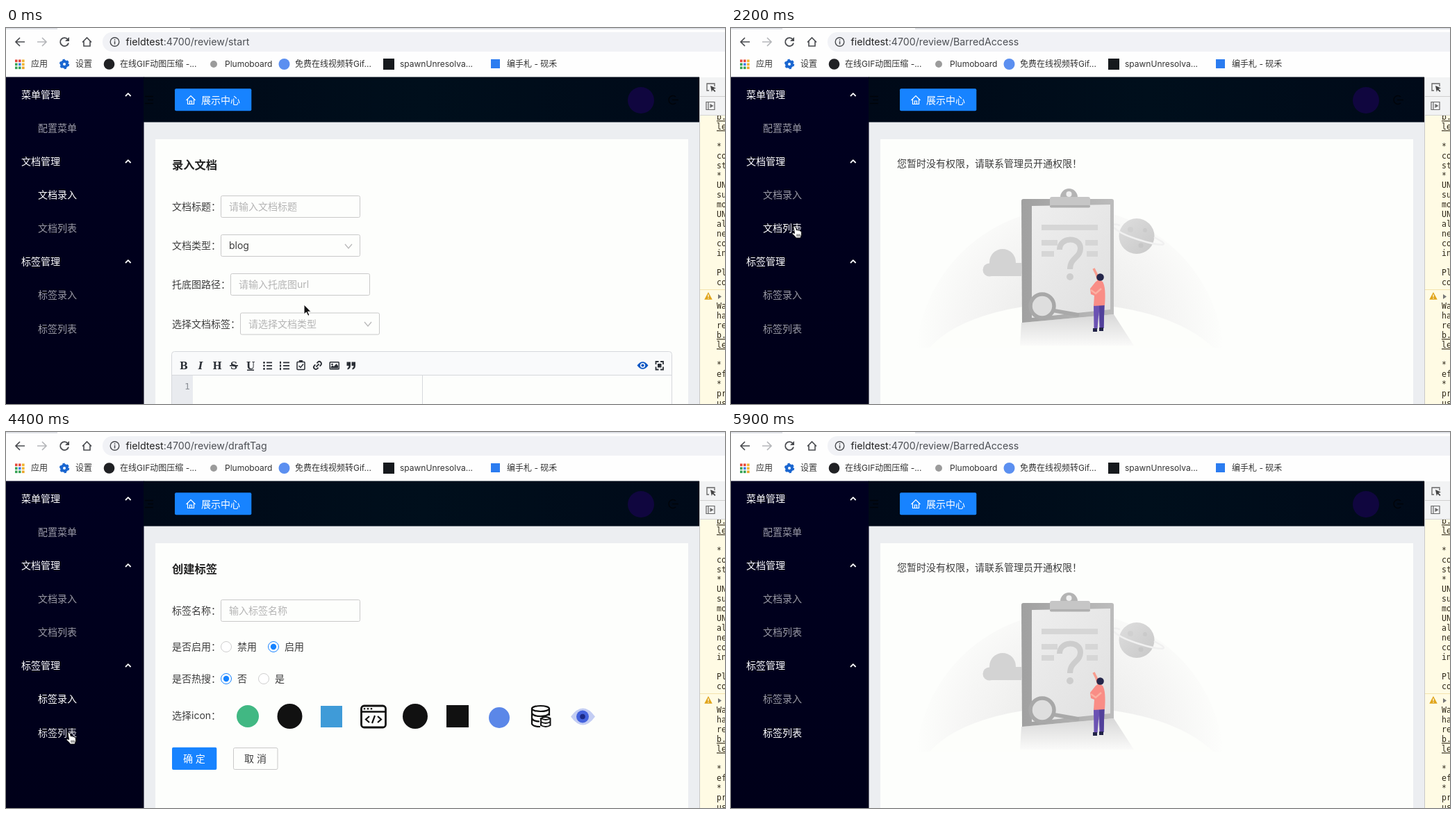
An HTML page for the animation above (6000 ms loop, 1035 px wide and 541 px high).

```html
<!DOCTYPE html>
<html lang="zh">
<head>
<meta charset="utf-8">
<style>
html, body { margin: 0; width: 100%; height: 100%; overflow: hidden; background: #fff }
svg { display: block; font-family: Inter, "Noto Sans CJK SC", "Noto Sans CJK", sans-serif }
text { white-space: pre }
.mono { font-family: "DejaVu Sans Mono", monospace }
.slab { font-family: "DejaVu Serif", "Noto Serif", serif; font-weight: bold }
</style>
</head>
<body>
<svg id="stage" width="1035" height="541" viewBox="0 0 1035 541"></svg>
<script>
const INK = '#3c3c3c', BLUE = '#1783ff', LINE = '#c9c9c9', HINT = '#b4b4b4', MEDIUM = 'font-weight="500"';

// Shape helpers; text is placed by its vertical centre
const text = (x, y, s, size = 14, fill = INK, more = '') =>
  `<text x="${x}" y="${y + size * .37}" font-size="${size}" fill="${fill}" ${more}>${s}</text>`;
const rect = (x, y, w, h, fill, more = '') =>
  `<rect x="${x}" y="${y}" width="${w}" height="${h}" fill="${fill}" ${more}/>`;
const disc = (x, y, r, fill, more = '') =>
  `<circle cx="${x}" cy="${y}" r="${r}" fill="${fill}" ${more}/>`;
const path = (d, stroke, w = 1.5, fill = 'none') =>
  `<path d="${d}" stroke="${stroke}" stroke-width="${w}" fill="${fill}"/>`;
const shape = (d, fill) => `<path d="${d}" fill="${fill}"/>`;
const frame = (x, y, w, h, stroke = LINE, r = 2, sw = 1) =>
  rect(x + .5, y + .5, w, h, 'none', `stroke="${stroke}" stroke-width="${sw}" rx="${r}"`);

const defs = `<defs>
  <radialGradient id="halo" gradientUnits="userSpaceOnUse" cx="488" cy="440" r="222">
    <stop offset=".3" stop-color="#ededec"/><stop offset=".7" stop-color="#f6f6f5"/>
    <stop offset="1" stop-color="#fdfefc"/></radialGradient>
  <linearGradient id="side" x2="0" y2="1"><stop stop-color="#000020"/><stop offset="1" stop-color="#000019"/></linearGradient>
  <linearGradient id="top"><stop stop-color="#000918"/><stop offset=".5" stop-color="#000f1c"/>
    <stop offset="1" stop-color="#000a19"/></linearGradient>
  <linearGradient id="edge"><stop stop-color="#a0a0a0"/><stop offset="1" stop-color="#bcbcbc"/></linearGradient>
  <linearGradient id="paper" x2="1" y2="1"><stop stop-color="#eeeeee"/><stop offset="1" stop-color="#e0e0e0"/></linearGradient>
  <linearGradient id="shade" x2="0" y2="1"><stop stop-color="#d8d8d8"/><stop offset="1" stop-color="#fafaf9"/></linearGradient>
  <linearGradient id="ball" x2="1" y2="1"><stop stop-color="#dedede"/><stop offset="1" stop-color="#c8c8c8"/></linearGradient>
</defs>`;

function browserBar() {
  const dark = '#4a4c50';
  let s = rect(0, 0, 1035, 71, '#fefefe') + rect(0, 0, 74, 2, '#dfe1e6') + rect(265, 0, 770, 2, '#dfe1e6')
    + rect(139, 6, 920, 28, '#f1f2f6', 'rx="14"')
    + path('M27 20H14M20 14l-6 6 6 6', dark, 1.7)
    + path('M45 20H58M52 14l6 6-6 6', '#b5b7ba', 1.7)
    + path('M89 16.5A6 6 0 1 0 90 21.5', dark, 1.8) + shape('M91 13v6h-6z', dark)
    + path('M110 20.5l6.5-6.5 6.5 6.5M112 19v7h9v-7', dark, 1.6)
    + disc(156.5, 20, 6.3, 'none', `stroke="${dark}" stroke-width="1.4"`)
    + rect(155.8, 19, 1.5, 4.5, dark) + rect(155.8, 16.3, 1.5, 1.6, dark);
  const dots = ['#e5493a', '#e5493a', '#f0b32e', '#39a457', '#4180e8', '#f0b32e', '#39a457', '#39a457', '#e9a52b'];
  dots.forEach((c, i) => s += rect(13 + i % 3 * 5, 45.5 + (i / 3 | 0) * 5, 3.6, 3.6, c));
  s += disc(84, 52, 4, 'none', 'stroke="#1a66d0" stroke-width="4"')
    + disc(84, 52, 6, 'none', 'stroke="#1a66d0" stroke-width="2.4" stroke-dasharray="3.14"')
    + disc(148.5, 52, 7.8, '#202124') + disc(299, 52, 5, '#9b9b9b') + disc(400.5, 52, 8, '#5b8ff0')
    + rect(543, 44, 16, 16, '#16191d') + rect(698, 45, 13, 13, '#2b7cf0');
  [[36, '应用'], [100, '设置'], [164, '在线GIF动图压缩 -...'], [315, 'Plumoboard'], [416, '免费在线视频转Gif...'],
   [567, 'spawnUnresolva...'], [721, '编手札 - 砚禾']].forEach(([x, w]) => s += text(x, 52, w, 12, '#333'));
  return s;
}

function devPanel() {
  let s = rect(998, 71, 37, 470, '#fffbe4') + rect(998, 71, 37, 54, '#f2f3f4')
    + rect(998, 98, 37, 1, '#cfcfcf') + rect(998, 125, 37, 1, '#d4d4d4')
    + path('M1012 90h-3v-10h11v4', '#666', 1.3) + shape('M1014 83l8 3.5-3.5 1.3 3 3-1.3 1.3-3-3-1.4 3z', '#444')
    + path('M1008 106.500h12v11h-12zM1011 106.500v11', '#666', 1.2) + shape('M1013.500 109l5 3-5 3z', '#666');
  const lines = ['b.', 'le', '', '* ', 'co', 'st', '* ', 'UN', 'su', 'mo', 'UN', 'al', 'ne', 'co', 'in', '', 'Pl', 'co', '',
    '', 'Wa', 'ha', 're', 'b.', 'le', '', '* ', 'ef', '* ', 'pr', 'us'];
  // Rows sit 14px apart, with the second message shifted below the divider
  let log = '';
  lines.forEach((w, i) => log += text(1023, (i < 19 ? 128 : 120) + i * 14, w, 11.5, '#2e2718',
    'class="mono"' + (/b\.|le/.test(w) ? ' text-decoration="underline"' : '')));
  return s + `<svg x="0" y="126" width="1035" height="415" viewBox="0 126 1035 415">${log}</svg>`
    + rect(999, 376, 36, 1, '#f3e3ad') + path('M1011 381.500l4.500 8.500h-9z', '#e0a51b', 1.5, '#e0a51b')
    + rect(1010.4, 383.500, 1.3, 3.5, '#fff') + rect(1010.4, 388, 1.3, 1.3, '#fff') + shape('M1025 383l5 3.500-5 3.500z', '#777')
    + rect(998, 71, 1, 470, '#c8c8c8');
}

function shell() {
  let s = rect(198.5, 135, 800, 406, '#eceef1') + rect(0, 70.5, 198.5, 471, 'url(#side)')
    + rect(198, 70.5, 800, 65, 'url(#top)') + rect(215, 160, 767, 381, '#fdfefc');
  [[96, '菜单管理'], [192, '文档管理'], [336, '标签管理']].forEach(([y, w]) =>
    s += text(22, y, w, 14, '#fff', MEDIUM) + path(`M172 ${y + 2}l3.800-3.800 3.800 3.800`, '#fff', 1.8));
  s += path('M200 98.500h12M204 103.500h8M200 108.500h12', '#00040a', 1.5)
    + rect(243, 87.3, 110.3, 32, BLUE, 'rx="2"') + path('M259.500 104l6.500-6.500 6.500 6.500M261.500 102.500v7h9v-7M264.500 109v-4h3v4', '#fff', 1.2)
    + text(281, 103.5, '展示中心', 14, '#fff')
    + disc(914, 104, 19, '#10063f')
    + path('M964 99a6 6 0 1 0 0 9M959 103.500h9', '#000409', 1.4);
  return s;
}

const title = s => text(239, 197, s, 16.3, '#222', 'font-weight="700"');
const field = (x, y, hint, label, fill = HINT) =>
  text(239, y, label) + frame(x, y - 16, 200, 31) + text(x + 12, y, hint, 14, fill);
const arrowDown = (x, y) => path(`M${x - 5} ${y - 3}l5 6 5-6`, '#b9b9b9', 1.3);
const eye = (x, y, w, h, fill) => shape(`M${x - w} ${y}Q${x} ${y - 2 * h} ${x + w} ${y}Q${x} ${y + 2 * h} ${x - w} ${y}z`, fill);

function docPage() {
  const k = '#2b2f36';
  let s = title('录入文档') + field(309, 257, '请输入文档标题', '文档标题：')
    + field(309, 313, 'blog', '文档类型：', INK) + arrowDown(493, 314)
    + field(323, 369, '请输入托底图url', '托底图路径：')
    + field(337, 425.5, '请选择文档类型', '选择文档标签：') + arrowDown(521, 426);
  s += rect(239, 466, 719, 34, '#f9fafb', 'rx="4"') + rect(239, 500, 30, 41, '#e9ebef')
    + path('M238.500 541V469.500a4 4 0 0 1 4-4H954.500a4 4 0 0 1 4 4V541M239 499.500H958M599.500 500V541', '#d6d8dc', 1)
    + text(257, 515, '1', 13, '#8b8f96', 'class="mono"');
  const letter = (x, c, more = '') => text(x, 485.5, c, 14, k, `class="slab" text-anchor="middle" ${more}`);
  s += letter(256, 'B') + letter(280, 'I', 'font-style="italic"') + letter(304, 'H') + letter(328, 'S')
    + rect(322, 485, 12, 1.6, k) + letter(352, 'U') + rect(347, 491.500, 10, 1.5, k);
  [-4.5, 0, 4.5].forEach(d => s += rect(375, 485 + d, 8, 1.8, k) + disc(371.5, 486 + d, 1.4, k)
    + rect(399, 485 + d, 9, 1.8, k) + rect(394, 484.300 + d, 2, 3.3, k));
  return s + frame(418.5, 480, 11, 11, k, 1, 1.5) + rect(422, 478, 5, 3, k) + path('M421.500 486l2.500 2.500 4-5', k)
    + `<g transform="rotate(-45 448.500 485.500)">${path('M447 482.500h-2a3 3 0 0 0 0 6h2M450 482.500h2a3 3 0 0 1 0 6h-2M445.500 485.500h6', k, 1.9)}</g>`
    + rect(465.5, 480, 14.5, 11.5, k, 'rx="1.5"') + rect(467, 481.500, 11.5, 8.500, '#f9fafb') + disc(469.500, 484, 1.3, k)
    + shape('M467.500 489.500v-2l2.500-2 2 1.500 3.500-4 2.500 3v3.500z', k)
    + [490.5, 497.5].map(x => shape(`M${x} 480.500h5.500v5q0 5-4.500 6v-2q2-.7 2-3.500h-3z`, k)).join('')
    + eye(916.500, 485.500, 8, 5.3, '#0b57c4') + disc(916.500, 485.500, 3.6, '#f9fafb') + disc(916.500, 485.500, 2.1, '#0b57c4')
    + path('M935.500 484v-4h4M942 480h4v4M946 487.500v4h-4M939.500 491.500h-4v-4', k, 1.8) + rect(938, 483, 5.5, 5.5, k);
}

function deniedPage() {
  const bar = (x, y, w) => rect(x, y, w, 8, '#d6d6d6');
  return text(239, 195, '您暂时没有权限，请联系管理员开通权限！')
    + shape('M267 460A222 222 0 0 1 709 460z', 'url(#halo)')
    + shape('M285 461C360 375 610 375 695 461z', '#fdfefb')
    + shape('M418 424L551 412 580 457H416z', 'url(#shade)')
    // cloud
    + disc(372, 348, 9.5, '#d3d3d3') + disc(391, 337, 19, '#d3d3d3') + rect(372, 338, 46, 19, '#d3d3d3')
    // planet
    + disc(584, 299.5, 25.5, 'url(#ball)') + disc(575, 290, 4, '#d0d0d0') + disc(596, 291, 3, '#cacaca') + disc(590, 313, 3.5, '#c6c6c6')
    + path('M560 284C540 278 549 292 582 303S632 314 618 306L609 301', '#f0f0f0', 2.5)
    // clipboard
    + shape('M418 249q0-3 3-3H548q3 0 3 3V412L419 424z', 'url(#edge)')
    + shape('M433 256L546 254V405L433 417z', 'url(#paper)')
    + disc(486.500, 243.500, 12.5, '#b4b4b4') + rect(459, 243, 58, 15, '#c6c6c6', 'rx="3"') + rect(459, 255, 58, 3.5, '#b0b0b0', 'rx="1.700"')
    + disc(486.500, 239, 4, '#f0f0f0')
    + bar(447, 283, 81) + bar(447, 305, 23) + bar(447, 321, 18) + bar(510, 305, 18) + bar(512, 321, 16)
    + path('M473 319C473 300 503 300 503 317C503 331 488 330 488 347', '#cdcdcd', 8) + disc(488, 358, 5, '#cdcdcd')
    // magnifier
    + path('M464 406.500L501 413', '#a9a9a9', 5.5) + disc(448, 400, 17, '#dedede', 'stroke="#a8a8a8" stroke-width="5.500"')
    // person
    + path('M531 370L526 354 522 346', '#f79c8e', 3.5)
    + shape('M522 398h15.500l-1 34h-6l-1-24-2 25h-5z', '#6b52b3') + shape('M530 399h7.500l-1 33h-5z', '#51409a')
    + shape('M525 365q5-4 10 0 5 8 3 34l-16 1 1-15-5-2-1-8z', '#f98d86')
    + path('M518 377l7 5 8-7', '#fbb0a2', 2.5)
    + disc(531.500, 358.5, 5.3, '#25264a') + rect(521, 432, 6, 5, '#222447') + rect(530, 431, 6, 5, '#222447');
}

const radio = (x, y, on, label) => disc(x, y, 7.5, '#fff', `stroke="${on ? BLUE : '#cfcfcf'}"`)
  + (on ? disc(x, y, 4.2, BLUE) : '') + text(x + 16, y, label);

function tagPage() {
  const k = '#111';
  return title('创建标签') + field(309, 257, '输入标签名称', '标签名称：')
    + text(239, 308.5, '是否启用：') + radio(317, 309, 0, '禁用') + radio(385, 309, 1, '启用')
    + text(239, 355, '是否热搜：') + radio(317, 355, 1, '否') + radio(371, 355, 0, '是')
    + text(239, 408, '选择icon：')
    + disc(348, 409, 16, '#41b883') + disc(408.5, 409, 18, k) + rect(453, 394, 31, 31, '#3f9bd8')
    + rect(511.5, 394, 35, 31, 'none', `rx="4" stroke="${k}" stroke-width="2.8"`) + path('M512 402.500h34', k, 2.4)
    + [516, 521, 526].map(x => disc(x, 398.3, 1.3, k)).join('')
    + path('M523 409l-5 4.500 5 4.500M535 409l5 4.500-5 4.500M531 408l-4 11', k, 2.2)
    + disc(589, 409, 18, k) + rect(634, 393, 32, 32, k) + disc(710, 411, 15, '#5b87e8')
    + path('M757 398v22q2 4 12 4M782 398v10', k, 2.2) + `<ellipse cx="769.5" cy="398" rx="12.500" ry="4" fill="none" stroke="${k}" stroke-width="2.2"/>`
    + path('M757 405q3 4 12.500 4T782 405M757 412.500q3 4 11 4', k, 2.2)
    + path('M770 412v10q7 4 13.500 0V412q-6.500-4-13.500 0 7 4 13.500 0M770 417q7 4 13.500 0', k, 2, '#fdfefc')
    + eye(830.5, 409.5, 17.5, 12, '#c3cdf3') + disc(830, 409.500, 9, '#4463dd') + disc(830, 409.500, 3.8, '#1b2a86')
    + rect(239, 453.7, 64.3, 32.3, BLUE, 'rx="2"') + text(255, 470, '确 定', 14, '#fff', MEDIUM)
    + frame(327, 454, 63.5, 31) + text(343, 470, '取 消');
}

const arrow = path('M0 0V14L3.300 11 5.800 16.300 8 15.300 5.600 10.200H10z', '#fff', 1, '#111');
const hand = path('M2 1.500Q3.500-.5 5 1.500L6.500 6Q8 4.800 9 6.300 10.500 5.300 11.300 7 13 6.500 13.200 8.500L13.500 12Q13 14 12 17H5.500Q4 14 .500 11.500-.800 9.500 2 9.800L3.500 10.500z', '#111', 1, '#fff')
  + path('M7 11.500v3.500M9 11.500v3.500M11 11.500v3.500', '#111', .8);

// Sub-menu entries: label, row, and the span of time in which each is lit
const items = [['配置菜单', 144, 9e3, 9e3], ['文档录入', 240, -999, 1900], ['文档列表', 288, 1480, 3600],
  ['标签录入', 384, 3180, 4700], ['标签列表', 432.5, 4250, 9e3]];
const pages = [[0, 'doc', 'start'], [1900, 'denied', 'BarredAccess'], [3580, 'tag', 'draftTag'], [4680, 'denied', 'BarredAccess']];
const moves = [[0, 429, 398], [900, 429, 398], [1550, 88, 285], [2600, 88, 285], [3100, 87, 364],
  [3400, 84, 391], [3950, 84, 391], [4400, 87, 432], [6000, 87, 432]];
const LEAVE = 5800;

const $ = id => document.getElementById(id);
$('stage').innerHTML = defs + browserBar() + text(172.5, 20, 'fieldtest<tspan id="route" fill="#4c4f54"></tspan>', 14.2, '#222')
  + shell() + items.map(([w, y], i) => text(46, y, w, 14, '#fff', `id="item${i}" ${MEDIUM}`)).join('')
  + `<g id="doc">${docPage()}</g><g id="denied">${deniedPage()}</g><g id="tag">${tagPage()}</g>`
  + devPanel() + `<g id="cursor"><g id="arrow">${arrow}</g><g id="hand">${hand}</g></g>`;

const clamp = v => Math.max(0, Math.min(1, v));
const show = (id, on) => $(id).setAttribute('display', on ? 'inline' : 'none');

function draw(now) {
  const t = now % 6000;
  const [, page, route] = pages.filter(p => p[0] <= t).pop();
  ['doc', 'denied', 'tag'].forEach(id => show(id, id === page));
  $('route').textContent = ':4700/review/' + route;

  items.forEach(([, , on, off], i) =>
    $('item' + i).setAttribute('fill-opacity', .6 + .4 * clamp(Math.min((t - on) / 200, (off + 200 - t) / 200))));

  const i = moves.findIndex(m => m[0] > t), [t0, x0, y0] = moves[i - 1], [t1, x1, y1] = moves[i];
  const u = (t - t0) / (t1 - t0), e = u * u * (3 - 2 * u);
  const x = x0 + (x1 - x0) * e, y = y0 + (y1 - y0) * e;
  $('cursor').setAttribute('transform', `translate(${x} ${y})`);
  show('cursor', t < LEAVE);
  show('hand', x < 199);
  show('arrow', x >= 199);
  requestAnimationFrame(draw);
}
requestAnimationFrame(draw);
</script>
</body>
</html>
```
